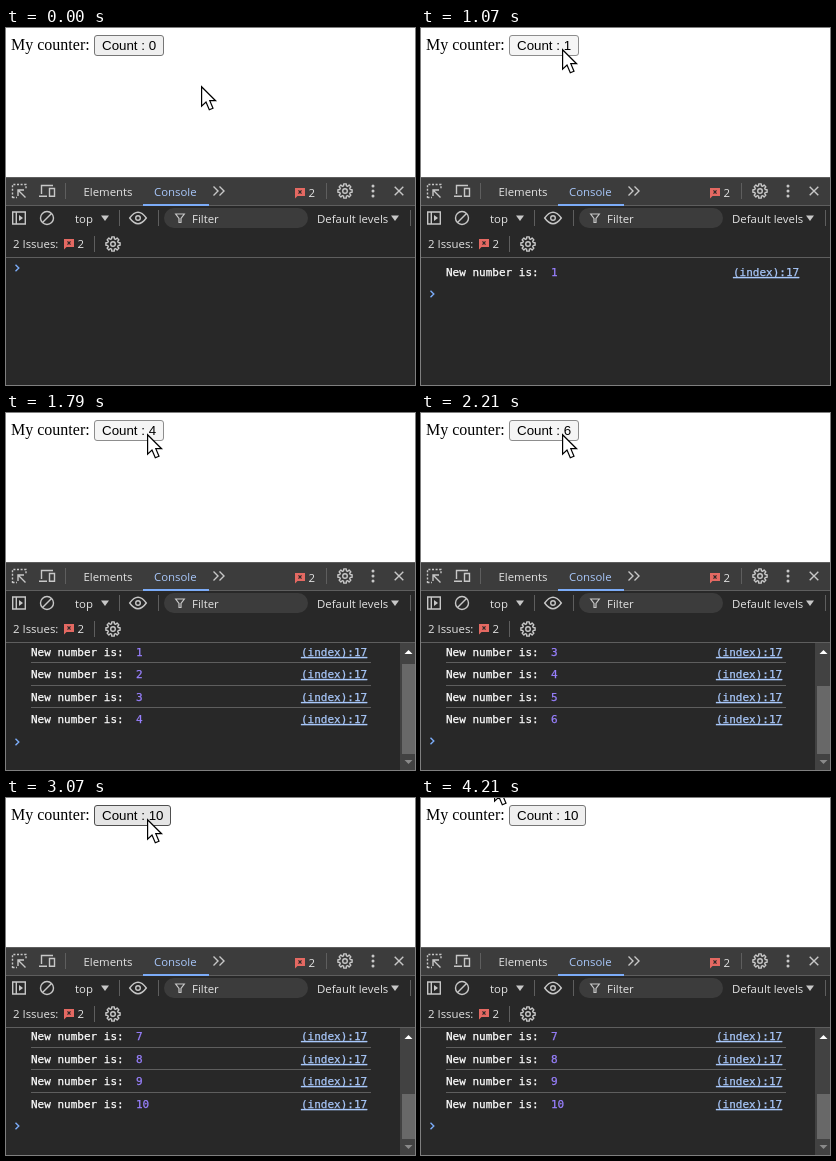
An HTML page that plays this animation: 409x357 px, repeating every 4.43 s.

```html
<!DOCTYPE html>
<html lang="en">
<head>
<meta charset="utf-8">
<title>Counter</title>
<style>
  html, body { margin: 0; width: 100%; height: 100%; overflow: hidden; background: #fff; }
  svg { display: block; width: 409px; height: 357px; }
  text { white-space: pre; }
  .page { font: 16px "Liberation Serif", "Times New Roman", serif; }
  .label { font: 13.333px "Liberation Sans", Arial, sans-serif; }
  .ui { font: 11.4px "Open Sans", "Noto Sans", sans-serif; fill: #e3e3e3; }
  .log { font: 11px "DejaVu Sans Mono", monospace; fill: #fff; stroke: #fff; stroke-width: .25; }
  .num { fill: #9980ff; stroke: #9980ff; }
  .link { fill: #a8c7fa; stroke: #a8c7fa; text-decoration: underline; }
  .icon { fill: none; stroke: #c7c7c7; stroke-width: 1.4; }
  .solid { fill: #c7c7c7; }
  .line { fill: #5e5e5e; }
  .blue { fill: #7cacf8; }
</style>
</head>
<body>
<svg viewBox="0 0 409 357">
  <defs>
    <g id="issue">
      <path d="M0 0H10V8H2.500L0 10.500Z" fill="#e46962"/>
      <path d="M3.500 2.400l3 3.200M6.500 2.400l-3 3.200" stroke="#282828" stroke-width="1.200"/>
    </g>
    <g id="gear" class="icon">
      <path id="teeth" stroke-linejoin="round"/>
      <circle r="2.300"/>
    </g>
  </defs>

  <text class="page" x="5" y="22">My counter:</text>
  <rect id="button" x="88.5" y="7.5" height="20" rx="2.5"/>
  <text id="label" class="label" x="96" y="22"></text>

  <rect y="149" width="409" height="208" fill="#282828"/>
  <rect y="149" width="409" height="28" fill="#3c3c3c"/>
  <g class="line">
    <rect y="149" width="409" height="1"/>
    <rect y="177" width="409" height="1"/>
    <rect y="229" width="409" height="1"/>
    <rect x="59" y="155" width="1" height="16"/>
    <rect x="320" y="155" width="1" height="16"/>
    <rect x="113" y="182" width="1" height="16"/>
    <rect x="152" y="182" width="1" height="16"/>
    <rect x="404" y="182" width="1" height="16"/>
    <rect x="88" y="208" width="1" height="16"/>
  </g>

  <!-- tab bar -->
  <g class="icon">
    <path d="M6.500 170V156.500H20V161M6.500 169.500H11" stroke-dasharray="2 1.600"/>
    <path d="M12 168V162H18M12.500 162.500L19.500 169.500"/>
    <path d="M35.500 166V157.500H47M33 168.300H41M43.500 160.500H48.500V168.300H43.500Z"/>
    <path d="M207.500 158.500L212 163L207.500 167.500M213.500 158.500L218 163L213.500 167.500"/>
    <path d="M388.700 158.700L397.300 167.300M397.300 158.700L388.700 167.300"/>
  </g>
  <text class="ui" x="77.500" y="168">Elements</text>
  <text class="ui" x="148" y="168" style="fill:#a8c7fa">Console</text>
  <rect class="blue" x="137" y="176" width="66" height="2"/>
  <use href="#issue" x="289" y="160"/>
  <text class="ui" x="302.500" y="169">2</text>
  <use href="#gear" x="339" y="163"/>
  <g class="solid">
    <circle cx="367" cy="158" r="1.500"/>
    <circle cx="367" cy="163" r="1.500"/>
    <circle cx="367" cy="168" r="1.500"/>
  </g>

  <!-- console toolbar -->
  <rect x="158" y="180" width="144" height="20" rx="10" fill="#3c3c3c"/>
  <g class="icon">
    <path d="M6.700 184H19.300V196H6.700ZM10.300 184V196"/>
    <circle cx="41" cy="190" r="6.500"/>
    <path d="M36.500 194.500L45.500 185.500"/>
    <path d="M123.700 190Q132 178.500 140.300 190Q132 201.500 123.700 190Z"/>
    <circle cx="132" cy="190" r="2.300"/>
    <path d="M169.700 186H178.300L175 190.500V194.500H173V190.500Z" stroke-width="1.200"/>
  </g>
  <g class="solid">
    <path d="M13 187L17 190L13 193Z"/>
    <path d="M95 187.500H103L99 193Z"/>
    <path d="M385 187.500H393L389 193Z"/>
  </g>
  <text class="ui" x="69" y="195">top</text>
  <text class="ui" x="186" y="195">Filter</text>
  <text class="ui" x="311" y="195">Default levels</text>

  <!-- issues bar -->
  <text class="ui" x="7" y="220">2 Issues:</text>
  <use href="#issue" x="58" y="211"/>
  <text class="ui" x="71.500" y="220">2</text>
  <use href="#gear" x="107" y="216"/>

  <g id="rows"></g>
  <path id="prompt" d="M-2 -3.300L1.300 0L-2 3.300" fill="none" stroke="#7cacf8" stroke-width="1.400"/>
  <g id="scroll">
    <rect x="394" y="230" width="15" height="127" fill="#424242"/>
    <rect id="thumb" x="396" width="13" fill="#686868"/>
    <path d="M398.500 241L402.500 237L406.500 241Z" fill="#fff"/>
    <path d="M398.500 347L402.500 351L406.500 347Z" fill="#8a8a8a"/>
  </g>
  <path id="cursor" d="M.6 .8V20.200L5 16L8.300 23.800L12 22.200L8.800 14.700H14.600Z"
    fill="#fff" stroke="#000" stroke-width="1.200"/>
</svg>

<script>
const LOOP = 4430;
const ROW = 22.4;
const BASE = 248;
// press and release times of each click
const CLICKS = [
  [710, 860], [1070, 1210], [1290, 1430], [1500, 1640], [1790, 1860],
  [2000, 2070], [2210, 2360], [2430, 2570], [2640, 2790], [2930, 3070]
];
// time, x and y of the pointer tip
const MOVES = [
  [0, 195, 58], [140, 193, 57], [210, 187, 53], [280, 176, 45], [360, 163, 36],
  [430, 151, 28], [500, 144, 23], [570, 141, 21],
  [4000, 135, 18], [4070, 115, 6], [4140, 91, -7], [4210, 73, -17]
];
const FILL = { normal: "#efefef", hover: "#e5e5e5", active: "#f5f5f5" };
const EDGE = { normal: "#767676", hover: "#4f4f4f", active: "#8d8d8d" };

const $ = id => document.getElementById(id);
const set = (el, attrs) => {
  for (const key in attrs) el.setAttribute(key, attrs[key]);
};

function gearPath() {
  const points = [];
  for (let i = 0; i < 8; i++) {
    for (const [turn, r] of [[-15, 5.4], [-10, 7.2], [10, 7.2], [15, 5.4]]) {
      const a = (i * 45 + turn) * Math.PI / 180;
      points.push((r * Math.cos(a)).toFixed(2) + " " + (r * Math.sin(a)).toFixed(2));
    }
  }
  return "M" + points.join("L") + "Z";
}

function drawLog(count) {
  const scrolled = count > 3;
  const first = scrolled ? count - 3 : 1;
  // the list scrolls by whole pixels, rows keep their fractional height
  const scroll = scrolled ? Math.floor(ROW * (count - 1) - 61.3) : 0;
  const baseline = n => BASE + ROW * (n - 1) - scroll;
  const right = scrolled ? 365 : 382;
  const linkX = right - 70;
  let html = "";
  for (let n = first; n <= count; n++) {
    const y = Math.round(baseline(n));
    html += `<text class="log" x="25" y="${y}">New number is:</text>` +
      `<text class="log num" x="130" y="${y}">${n}</text>` +
      `<text class="log link" x="${linkX}" y="${y}">(index):17</text>`;
    if (n < count) {
      const lineY = Math.round(baseline(n) + 6.4);
      html += `<rect class="line" x="25" y="${lineY}" width="${right - 25}" height="1"/>`;
    }
  }
  $("rows").innerHTML = html;

  const promptY = count ? Math.round(baseline(count) + 18.4) : 240;
  set($("prompt"), { transform: `translate(11.500 ${promptY})` });

  const size = Math.ceil(93 * 127 / (41.8 + ROW * count));
  $("scroll").style.display = scrolled ? "" : "none";
  if (scrolled) set($("thumb"), { y: 341 - size, height: size });
}

let shown = -1;

function draw(t) {
  const count = CLICKS.filter(c => t >= c[1]).length;
  const pressed = CLICKS.some(c => t >= c[0] && t < c[1]);
  const [, x, y] = MOVES.filter(m => t >= m[0]).pop();
  const width = count > 9 ? 77 : 70;
  const over = x >= 88 && x < 88 + width && y >= 7 && y < 28;
  const state = pressed ? "active" : over ? "hover" : "normal";

  set($("button"), { width: width - 1, fill: FILL[state], stroke: EDGE[state] });
  set($("cursor"), { transform: `translate(${x} ${y})` });
  if (count !== shown) {
    shown = count;
    $("label").textContent = "Count : " + count;
    drawLog(count);
  }
}

function tick() {
  draw(performance.now() % LOOP);
  requestAnimationFrame(tick);
}

set($("teeth"), { d: gearPath() });
tick();
</script>
</body>
</html>
```
